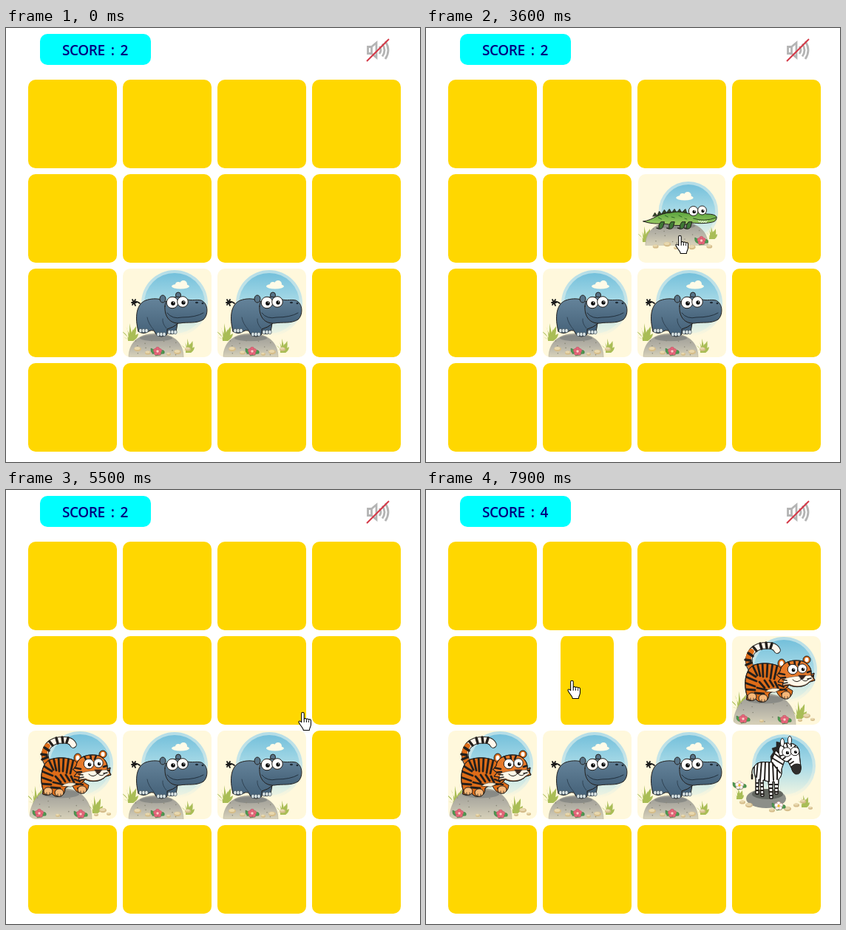
Recreate the animation shown at these times as an HTML page. Size 560 by 588 pixels, loop 8000 ms.

```html
<!DOCTYPE html>
<html lang="en">
<head>
<meta charset="utf-8">
<title>Memory game</title>
<style>
  html, body { margin: 0; width: 100%; height: 100%; overflow: hidden; background: #fff; }
  svg { display: block; }
  #score {
    font: 600 19px "Open Sans", "Noto Sans", sans-serif;
    letter-spacing: -.4px; word-spacing: 3.4px; fill: #000080;
  }
</style>
</head>
<body>
<svg id="stage" width="560" height="588" viewBox="0 0 560 588">
  <defs>
    <linearGradient id="sky" x2="0" y2="1">
      <stop offset="0" stop-color="#74c0db"/><stop offset=".5" stop-color="#aadbe7"/>
      <stop offset="1" stop-color="#eef4e2"/>
    </linearGradient>
    <linearGradient id="halo" x2="0" y2="1">
      <stop offset="0" stop-color="#b4dde7"/><stop offset=".6" stop-color="#d0e9e8"/>
      <stop offset="1" stop-color="#fff8dc"/>
    </linearGradient>
    <linearGradient id="stone" x2="0" y2="1">
      <stop offset="0" stop-color="#9b9a93"/><stop offset=".5" stop-color="#b5b2a6"/>
      <stop offset="1" stop-color="#d8d2ba"/>
    </linearGradient>
    <linearGradient id="hide" x2="0" y2="1">
      <stop offset="0" stop-color="#64839a"/><stop offset="1" stop-color="#435f76"/>
    </linearGradient>
    <linearGradient id="scales" x2="0" y2="1">
      <stop offset="0" stop-color="#57a23c"/><stop offset="1" stop-color="#a5d06b"/>
    </linearGradient>
    <clipPath id="round"><rect width="120" height="120" rx="10"/></clipPath>
  </defs>
  <rect x="46" y="8" width="150" height="42" rx="10" fill="#0ff"/>
  <text id="score" x="76" y="37">SCORE : 2</text>
  <g fill="none" stroke="#b4b4b4" stroke-width="2.8">
    <path d="M489.5 25.5h5v9h-5z M495 25l6-5v20l-6-5"/>
    <path d="M505 25q4 5 0 10 M509 21.5q6 8.5 0 17 M513 18q8 12 0 24"/>
    <path d="M488 45L518 15" stroke="#d43a48" stroke-width="2"/>
  </g>
  <g id="board"></g>
  <g id="cursor" fill="#fff" stroke="#000" stroke-linejoin="round">
    <path id="arrow" d="M0 0V16L4 12.5L6.5 19L9.5 17.8L7 11.5H12Z"/>
    <g id="hand" transform="translate(.7 1) scale(1.05)">
      <path d="M-1 13V2a1.7 1.7 0 0 1 3.4 0V9a1.6 1.6 0 0 1 3 .4a1.6 1.6 0 0 1 3 .6a1.5 1.5 0 0 1 2.8 .8V16c0 3-2 4-2 7.3H1.5c0-2-3-5-5.5-9.3c-1.6-2.6 .8-3.6 3-1z"/>
      <path d="M2.4 9v4M5.4 10v3M8.4 11v2" fill="none"/>
    </g>
  </g>
</svg>
<script>
const INK = '#231f1c';

// Drawing helpers, all in a 120 x 120 card
const shape = (d, fill, width = 1, ink = INK) =>
  `<path d="${d}" fill="${fill}" stroke="${ink}" stroke-width="${width}" stroke-linejoin="round" stroke-linecap="round"/>`;
const line = (d, ink = INK, width = 1) => shape(d, 'none', width, ink);
const oval = (x, y, rx, ry, fill, more = '') =>
  `<ellipse cx="${x}" cy="${y}" rx="${rx}" ry="${ry}" fill="${fill}" ${more}/>`;
const dot = (x, y, r, fill) => oval(x, y, r, r, fill);
const outlined = `stroke="${INK}"`;

const sky = (x, y, r) => dot(x, y, r, 'url(#halo)') + dot(x, y, r - 4, 'url(#sky)');
const cloud = (x, y) => oval(x, y + 2, 12, 3.5, '#fffbe8') + dot(x - 3, y, 4, '#fffbe8') + dot(x + 4, y - 1, 5, '#fffbe8');
const eye = (x, y, r, look = 1) =>
  oval(x, y, r, r, '#fff', outlined) + dot(x + look, y + 1, r * .36, '#000') + dot(x + look + .7, y, .8, '#fff');
const pebble = (x, y, r) => oval(x, y, r, r * .65, '#d5bd8b') + oval(x - .5, y - 1, r * .75, r * .4, '#e8d8ae');

function rock(x, y, rx, ry) {
  let out = shape(`M${x - rx} ${y + ry}C${x - rx} ${y} ${x - rx * .75} ${y - ry} ${x} ${y - ry}S${x + rx} ${y} ${x + rx} ${y + ry}Z`,
    'url(#stone)', .5, '#a8a491');
  out += oval(x, y - ry * .62, rx * .6, ry * .26, '#777b78', 'opacity=".6"');
  for (let i = 0; i < 14; i++)
    out += dot(x + rx * .75 * Math.sin(i * 2.4), y + ry * (.2 + .6 * Math.cos(i * 1.7)), .8, '#8a8878');
  return out;
}

function flower(x, y, petal, heart) {
  let out = shape(`M${x} ${y}l-9 -4q-1 9 9 8l9 -1q2 -7 -9 -3l-3 6l7 -1z`, '#4f9a50', .5, '#2e6b38');
  for (let i = 0; i < 5; i++)
    out += oval(x + 3.2 * Math.sin(i * 1.257), y - 3.2 * Math.cos(i * 1.257), 2.7, 2.7, petal, 'stroke="#a45a60" stroke-width=".4"');
  return out + dot(x, y, 1.7, heart);
}
const rose = (x, y) => flower(x, y, '#e8657a', '#fbd0c8');
const daisy = (x, y) => flower(x, y, '#fffef8', '#f0bd2c');

const grass = (x, y, s = 1) =>
  [[-11, -13], [-9, -5], [-6, -20], [-1, -24], [4, -16], [8, -20], [11, -10]].map(([dx, dy]) =>
    `<path d="M${x - 3} ${y}Q${x + dx * s * .2} ${y + dy * s * .6} ${x + dx * s} ${y + dy * s}Q${x + dx * s * .7 + 3} ${y + dy * s * .4} ${x + 4} ${y}Z" fill="#a9bd56"/>`).join('');

let clips = 0;
function striped(body, fill, stripes, width, ink = INK) {
  const id = 'clip' + clips++;
  return `<clipPath id="${id}"><path d="${body}"/></clipPath>` + shape(body, fill) +
    `<g clip-path="url(#${id})">${line(stripes, ink, width)}</g>` + line(body);
}

const toes = (x, y) => [0, 4, 8].map(d => oval(x + d, y, 2.2, 2.8, '#dbe5e6', 'stroke="#2b3b49" stroke-width=".6"')).join('');

const art = {
  hippo: () => sky(70, 47, 45) + cloud(78, 22) + grass(10, 98) + grass(88, 114, .8) + rock(45, 104, 37, 16) +
    [[20, 109, 5], [34, 114, 4], [74, 113, 5], [88, 109, 4], [62, 116, 3]].map(p => pebble(...p)).join('') +
    line('M23 47Q18 43 15 46M13 42l4 8M17 42l-4 7M12 46h6', '#1a1a1a', 1.8) +
    shape('M57 72L59 86Q66 91 72 86L75 68Z', '#435f76') +
    shape('M21 85C16 66 18 48 31 43C45 38 60 42 66 52L75 74Q68 80 60 82L60 89Q52 95 45 89L42 84Q38 83 35 85Q28 90 21 85Z', 'url(#hide)') +
    toes(24, 84) + toes(48, 89) + toes(63, 86) +
    line('M42 83Q34 74 33 66M59 81Q53 74 54 68', '#293a4a', .8) +
    oval(54, 41, 4, 5, '#587489', outlined) + oval(75, 36, 3.5, 4, '#587489', outlined) +
    shape('M57 51C57 39 70 36 84 40C91 45 98 41 106 43C116 47 116 63 109 69C99 75 88 72 77 74C63 75 56 64 57 51Z', 'url(#hide)') +
    line('M60 60Q67 69 80 66Q99 66 109 60', '#22313e') + oval(100, 46, 2, 1.2, '#1d2a35') + oval(108, 47, 1.5, 1.2, '#1d2a35') +
    eye(67, 46, 7.8) + eye(81, 45, 7.3) + rose(47, 112),

  tiger: () => sky(70, 46, 45) + grass(10, 101, 1.1) + grass(90, 112, 1) + rock(44, 99, 42, 21) +
    [[101, 108, 5], [92, 114, 3], [109, 113, 3], [40, 115, 3]].map(p => pebble(...p)).join('') +
    line('M27 46C17 30 26 15 42 13C52 12 58 13 61 19', INK, 9.5) +
    line('M27 46C17 30 26 15 42 13C52 12 58 13 61 19', '#fff8ec', 7.5) +
    line('M28 46C20 36 21 27 26 21', '#dd6c18', 7.5) +
    line('M19 39l7-3M18 32l7 1M22 23l6 4M29 15l4 5M38 10l2 7M46 9l1 7M54 10l-2 6', INK, 3.5) +
    shape('M62 62L82 74Q81 84 72 85Q64 84 60 75Z', '#dd6c18') +
    striped('M20 80C15 64 18 44 30 39C46 34 62 38 72 46L76 68Q68 76 58 73L50 78Q50 88 42 89Q35 90 32 85Q27 89 20 86Z', '#dd6c18',
      'M18 46l14 9M16 54l17 7M17 63l14 5M18 72l13 1M27 38l7 15M34 36l4 18M41 35l1 20M48 36l-1 19M55 36l-3 21M61 40l-4 18M37 62l7 8M44 60l6 9M51 60l5 8M58 62l4 8M31 77l12 1M34 70l13 3', 2.8) +
    shape('M45 75Q54 68 66 72L58 76Z', '#fff1d8', .6) + line('M63 66l7 3M65 72l9 1M67 78l7-2', INK, 2.2) +
    [[27, 82], [42, 84], [73, 80]].map(([x, y]) => oval(x, y, 6, 5.2, '#f6b778', outlined) + line(`M${x - 2} ${y + 5}v-3m4 3v-3`, INK, .8)).join('') +
    oval(67, 37, 5, 6, '#dd6c18', outlined) + oval(67, 37, 2.5, 3.5, '#fff') +
    oval(101, 32, 5, 5, '#dd6c18', outlined) + oval(101, 32, 2.5, 3, '#fff') +
    striped('M65 47C67 34 83 31 96 34C105 38 108 46 107 52L111 50L110 56L112 60L105 62C98 70 84 70 77 66L68 68L69 63L62 62L66 57L61 53Z', '#e6792a',
      'M75 33l4 8M84 31l1 8M93 31l-3 8M61 50l10 2M62 57l10-1M111 46l-9 3M112 54l-7 0', 2.6) +
    shape('M71 58C78 54 98 54 106 53L110 58L104 62C98 69 84 69 78 65L69 66Z', '#fff8e9', .4) +
    line('M68 59l6 1M69 64l6-1M107 57l-5 1', INK, 1.5) +
    eye(82, 45, 6.8) + eye(95, 44, 6.2) +
    shape('M90 53h10l-4 5h-3z', '#3b2620', .5) + line('M94 58Q88 65 82 59M94 58Q99 64 104 58') + rose(15, 112) + rose(71, 113),

  buffalo: () => sky(70, 47, 42) + grass(9, 102, .9) + grass(94, 107, .9) + rock(43, 101, 39, 20) +
    line('M22 42Q14 54 14 45T19 39', '#6b431f', 1.5) + shape('M16 52l-4-9l-1-5l4 4l3-3l0 8z', '#352218', .6) +
    [[27, 62, 92], [61, 62, 90]].map(([x, y, b]) => shape(`M${x} ${y}l8 0l-2 ${b - y}h-5z`, '#a46f37', .8) + shape(`M${x + 1} ${b - 3}h5v4h-6z`, '#332820', .6)).join('') +
    striped('M20 47C20 34 32 35 41 31C52 24 62 27 70 36L74 59C69 70 59 68 52 69L48 80L47 96H41L42 69L30 66L28 96H21L23 68C20 62 20 54 20 47Z', '#d19c55',
      'M35 32l-1 20M42 30l-3 27M49 29l-3 30M56 27l-4 37M63 30l-4 34', 2.2, '#63422a') +
    shape('M21 93h7v4h-7zM41 93h6v4h-7z', '#332820', .6) +
    shape('M38 33Q43 22 46 26L49 19L53 23L57 17L60 22L67 20L66 27L74 28L70 36L57 30Z', '#34251d', .7) +
    shape('M68 42Q52 36 57 25Q62 37 74 37L86 38Q99 37 92 23Q107 35 94 43Q84 47 68 42Z', '#5f4736') +
    shape('M65 45l-7 3l6 7zM95 44l9-1l-7 8z', '#a36d38') +
    shape('M66 43Q79 36 94 43L97 65Q99 80 90 83Q80 86 75 76Q67 64 66 43Z', '#a7733d') +
    shape('M74 70Q83 64 96 65Q98 80 90 83Q80 85 74 70Z', '#493429') +
    oval(83, 74, 1.5, 2, '#17110e') + oval(92, 73, 1.5, 2, '#17110e') + eye(72, 51, 7.5) + eye(85, 50, 7) +
    rose(7, 114) + daisy(87, 111) + pebble(71, 116, 3) + pebble(106, 113, 4),

  parrot: () => oval(63, 53, 48, 50, 'url(#halo)') + oval(63, 53, 43, 45, 'url(#sky)') + cloud(63, 29) +
    shape('M50 64C37 60 31 49 11 54Q30 34 55 60Z', '#68b7cf') +
    shape('M49 62C36 53 30 40 15 42Q37 29 54 59Z', '#7dbd57') +
    shape('M49 60Q34 45 30 31Q48 38 55 57Z', '#268fa8') +
    line('M15 52Q34 46 51 62M20 41Q36 44 50 59', '#f3cf3d', 2) +
    shape('M52 64Q38 59 31 64Q31 74 45 73Z', '#efb232') +
    shape('M56 56Q53 43 58 38L62 45L68 35L69 45L75 40Q77 53 73 62Z', '#c91e2b') +
    shape('M45 61Q56 52 74 60Q85 53 96 64Q97 76 81 80Q64 84 52 79L48 84L43 81L37 87L35 82L28 87Q31 73 47 72Z', '#d52631') +
    line('M49 68l8 6M57 63l7 7M65 62l5 8M53 76l8-1M66 74l8 2', '#8d1520') +
    shape('M81 71Q92 67 101 72Q103 83 96 84L94 80Q83 80 81 71Z', '#f2bc3c') + line('M85 76Q92 80 97 75', '#9c6a1c', .8) +
    eye(83, 62, 7) + eye(94, 61, 6.5),

  croc: () => sky(69, 51, 41) + cloud(64, 30) + grass(9, 92, .9) + grass(101, 88, .7) + rock(53, 80, 43, 16) +
    [[24, 98, 4], [40, 95, 5], [52, 100, 3], [66, 94, 4], [74, 99, 5], [98, 98, 4]].map(p => pebble(...p)).join('') +
    shape('M20 57l3-5l3 4l3-6l3 4l4-6l3 4l4-5l3 5l4-5l3 5l4-5l3 5l5-5l3 8z', '#304527', .6) +
    shape('M7 64C22 62 26 53 46 52C58 49 68 54 74 54Q84 49 94 54Q106 54 108 58Q108 64 102 65C88 68 80 66 71 66Q59 72 42 68C31 66 22 69 7 64Z', 'url(#scales)') +
    [31, 45, 60, 69].map(x => shape(`M${x} 65q-4 5-2 8h-4q6 3 9-1l2-7z`, '#3f7835')).join('') +
    line('M28 59l4 2M37 56l4 2M46 58l4 1M56 56l4 2M64 60l3 1', '#2f6728') +
    line('M76 60Q91 65 107 59', '#27401f') + line('M83 63l1 2l2-2l1 3l2-3l1 3l2-3l1 3l2-3', '#fff', .8) +
    eye(76, 50, 6.5) + eye(88, 49, 6) + rose(87, 90),

  zebra: () => sky(70, 48, 43) + oval(46, 92, 27, 13, '#8d8f89') + oval(48, 86, 21, 7, '#62665f') + grass(9, 93, .6) + grass(97, 104, .7) +
    [[14, 97, 4], [23, 101, 5], [75, 106, 5], [87, 101, 4], [96, 96, 4], [54, 108, 4], [106, 105, 3]].map(p => pebble(...p)).join('') +
    line('M31 48Q26 51 27 60', INK, 1.3) + line('M27 60v5', INK, 2.6) +
    shape('M60 34L53 42L52 35L56 29L54 24L60 22L60 15L68 17L70 36Z', '#262626', .6) +
    striped('M30 50C31 42 42 42 52 43L59 27L72 38L67 52Q68 62 63 66L62 86H58L57 69L55 69L55 92H51L49 69L42 67L43 89H39L38 67L36 66L36 86H32L32 65Q29 57 30 50Z', '#fff',
      'M35 41l-2 22M40 41l-2 26M45 42l-1 25M50 43l0 26M55 44l1 23M54 37l15 9M53 42l12 15M57 31l14 10M61 50l0 16M30 71h14M30 76h14M30 81h14M30 86h14M48 73h16M48 78h16M48 83h16M48 88h9', 2) +
    striped('M63 29C62 19 70 16 78 17C88 18 91 24 91 32L93 49C94 59 83 60 81 52L76 42C69 42 64 37 63 29Z', '#fff',
      'M67 18l4 6M73 15l2 7M80 14l0 7M87 18l-3 5M62 35l8-2M66 41l6-5M74 43l6-5M77 46l6-4', 1.8) +
    shape('M80 49Q85 43 92 46L93 49Q94 60 86 59Q81 57 80 49Z', '#302e2d') +
    oval(68, 16, 2.6, 5.5, '#fff', outlined) + oval(78, 13, 2.6, 5.5, '#fff', outlined) + eye(74, 29, 6.2) + eye(85, 28, 5.8) +
    daisy(10, 74) + daisy(63, 102)
};

const FLIP = 500, LOOP = 8000, STEP = 100, HIDDEN_UNTIL = 500, SCORED = 5830;

// Slot: picture and the times at which it turns over
const deals = {
  1: ['buffalo', 1200, 2840], 2: ['parrot', 2150, 2840],
  5: ['parrot', 3985, 4665, 7800], 6: ['croc', 3250, 4665],
  7: ['tiger', 5830], 8: ['tiger', 5000], 9: ['hippo', -FLIP], 10: ['hippo', -FLIP], 11: ['zebra', 7150]
};

// Pointer path: time, x, y of the hot spot
const path = [
  [500, 476, 357], [1000, 238, 126], [1250, 238, 126], [1500, 276, 119], [1700, 280, 119], [1800, 280, 119],
  [2100, 327, 125], [2850, 327, 125], [3200, 342, 280], [3750, 342, 280], [4000, 242, 283], [4200, 242, 283],
  [4600, 103, 344], [4900, 76, 419], [5100, 76, 419], [5500, 400, 300], [5800, 450, 250], [5900, 450, 250],
  [6100, 377, 302], [6400, 354, 304], [6500, 354, 304], [7000, 448, 391], [7150, 448, 391], [7700, 196, 257]
];

const $ = id => document.getElementById(id);
const cards = Array.from({ length: 16 }, (_, i) => {
  const [face, ...flips] = deals[i] || [];
  return { x: 90 + i % 4 * 128, y: 130 + (i >> 2) * 128, face, flips };
});
$('board').innerHTML = cards.map(c => `<g>
  <rect x="-60" y="-60" width="120" height="120" rx="10" fill="#ffd700"/>
  <g transform="translate(-60 -60)" clip-path="url(#round)"><rect width="120" height="120" fill="#fff8dc"/>${c.face ? art[c.face]() : ''}</g>
</g>`).join('');
cards.forEach((c, i) => c.node = $('board').children[i]);

// cubic-bezier(.25, .1, .25, 1)
function ease(x) {
  if (x <= 0) return 0;
  if (x >= 1) return 1;
  let lo = 0, hi = 1;
  for (let i = 0; i < 20; i++) {
    const u = (lo + hi) / 2;
    if (.75 * u * (1 - u) + u ** 3 < x) lo = u; else hi = u;
  }
  return .3 * lo * (1 - lo) ** 2 + 3 * lo * lo * (1 - lo) + lo ** 3;
}

function pointer(t) {
  const i = path.findIndex(p => p[0] > t);
  if (i < 0) return path[path.length - 1].slice(1);
  if (i === 0) return path[0].slice(1);
  const [a, b] = [path[i - 1], path[i]];
  const k = (t - a[0]) / (b[0] - a[0]), s = k * k * (3 - 2 * k);
  return [a[1] + (b[1] - a[1]) * s, a[2] + (b[2] - a[2]) * s];
}

const show = (node, on) => node.setAttribute('visibility', on ? 'inherit' : 'hidden');

function draw(t) {
  const [px, py] = pointer(t);
  let over = false;
  for (const { x, y, node, flips } of cards) {
    const turn = Math.cos(Math.PI * flips.reduce((sum, s) => sum + ease((t - s) / FLIP), 0));
    const scale = Math.abs(turn);
    node.setAttribute('transform', `translate(${x} ${y}) scale(${scale} 1)`);
    show(node.children[0], turn >= 0);
    show(node.children[1], turn < 0);
    over ||= Math.abs(px - x) <= 60 * scale && Math.abs(py - y) <= 60;
  }
  $('cursor').setAttribute('transform', `translate(${px} ${py})`);
  $('cursor').setAttribute('visibility', t < HIDDEN_UNTIL ? 'hidden' : 'visible');
  show($('hand'), over);
  show($('arrow'), !over);
  $('score').textContent = 'SCORE : ' + (t < SCORED ? 2 : 4);
}

// The picture advances in hard steps, ten a second
const start = performance.now();
function tick() {
  const t = (performance.now() - start) % LOOP;
  draw(Math.floor(t / STEP) * STEP);
  requestAnimationFrame(tick);
}
tick();
</script>
</body>
</html>
```
